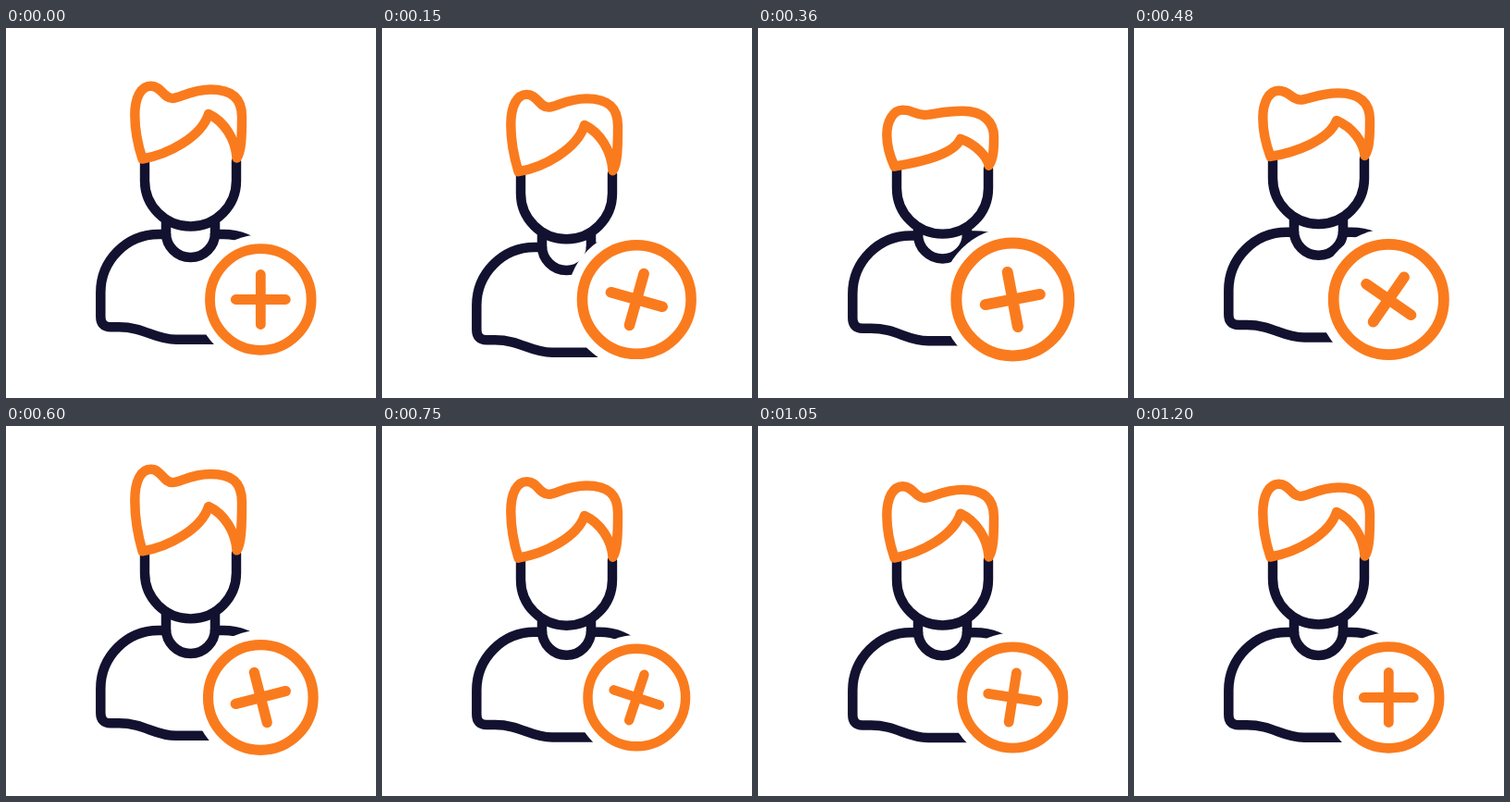
An HTML page with a canvas for the animation above (3230 ms loop, 400 by 400 pixels).

```html
<!DOCTYPE html>
<html lang="en">
<head>
<meta charset="utf-8">
<title>Add user</title>
<style>
  html, body { margin: 0; width: 100%; height: 100%; overflow: hidden; background: #fff; }
  canvas { display: block; width: 100vmin; height: 100vmin; }
</style>
</head>
<body>
<canvas id="stage" width="400" height="400"></canvas>
<script>
const ctx = document.getElementById('stage').getContext('2d');
const LOOP = 3230, STEP = 30, END = 1200;
const DARK = '#121230', ORANGE = '#fa7b1d';
const { PI, sin, cos, exp } = Math;

// Sine easing from 0 at the start, through [time, value] peaks, to `last` at the end
function swing(peaks, last = 0) {
  const keys = [[0, 0], ...peaks, [END, last]];
  return t => {
    const i = Math.max(1, keys.findIndex(key => key[0] >= t));
    const [t0, v0] = keys[i - 1], [t1, v1] = keys[i];
    return v0 + (v1 - v0) * (1 - cos(PI * (t - t0) / (t1 - t0))) / 2;
  };
}

// Vertical offsets: the crown and fringe follow the head late and overshoot it
const bodyY = t => 29.4 * exp(-0.0045 * t) * sin(PI * t / 390);
const headY = swing([[205, 16.5], [580, -6.3], [820, 3]]);
const crownY = swing([[370, 26], [590, -16], [870, 6]]);
const fringeY = swing([[330, 28], [590, -6], [800, 5.5]]);

// The badge pulses while it makes half a turn
const scale = t => 1 + 0.113 * sin(PI * t / 670) / (1 + (t / 850) ** 16);
const spin = swing([[840, 204]], 180);

function stroke(color, width, path) {
  ctx.strokeStyle = color;
  ctx.lineWidth = width;
  ctx.stroke(new Path2D(path));
}

function at(x, y, paint) {
  ctx.save();
  ctx.translate(x, y);
  paint();
  ctx.restore();
}

function drawBody(neckTop) {
  stroke(DARK, 10.5, `M173 223H165A62.7 63 0 0 0 102.3 286V312Q102.3 323.3 113 323.3H122
    C150 323.3 160 336.8 184 336.8H240 M226 223H235A63 63 0 0 1 298 286`);
  stroke(DARK, 10.5, `M173 ${neckTop}V221.5A26.5 26.5 0 0 0 226 221.5V${neckTop}`);
}

// c and f: how far the crown and the fringe have moved against the head
function drawHead(c, f) {
  stroke(DARK, 10.4, 'M150 144V165A49.5 49.5 0 0 0 249 165V144');
  const bump = 62.7 + c;
  const dip = 76 + c * (c > 0 ? 0.55 : 0.9);
  const top = 66.5 + c * 0.85;
  const side = 94 + c * 0.75;
  stroke(ORANGE, 10.4, `M147.5 141.5
    C143 ${128 + c * 0.2} 139.3 ${113 + c * 0.5} 139.3 ${side}
    C139.3 ${75 + c} 146 ${bump} 156.5 ${bump}
    C168 ${bump} 170 ${dip} 180 ${dip}
    C188 ${dip} 200 ${top} 221 ${top}
    C244 ${top} 255 ${76 + c} 255 ${side + 2}
    C255 ${118 + c * 0.3} 254.5 133 249.5 140.5
    C248 ${120 + f * 0.6} 236 ${101 + f * 0.9} 219 ${93 + f}
    C211 ${118 + f * 0.6} 175 137 147.5 141.5Z`);
}

function drawBadge(size, angle) {
  ctx.scale(size, size);
  ctx.fillStyle = '#fff';
  ctx.beginPath();
  ctx.arc(0, 0, 70, 0, PI * 2);
  ctx.fill();
  stroke(ORANGE, 10.8, 'M54.8 0A54.8 54.8 0 1 1 -54.8 0A54.8 54.8 0 1 1 54.8 0Z');
  ctx.rotate(angle * PI / 180);
  stroke(ORANGE, 10.8, 'M-27 0H27M0 -27V27');
}

function draw(t) {
  ctx.fillStyle = '#fff';
  ctx.fillRect(0, 0, 400, 400);
  ctx.lineCap = ctx.lineJoin = 'round';
  const body = bodyY(t), head = headY(t);
  at(0, body, () => drawBody(207 + head - body));
  at(0, head, () => drawHead(crownY(t) - head, fringeY(t) - head));
  at(275.3, 293.5, () => drawBadge(scale(t), spin(t)));
}

const start = performance.now();
function frame() {
  const t = (performance.now() - start) % LOOP;
  draw(Math.min(END, Math.floor(t / STEP) * STEP));
  requestAnimationFrame(frame);
}
frame();
</script>
</body>
</html>
```
